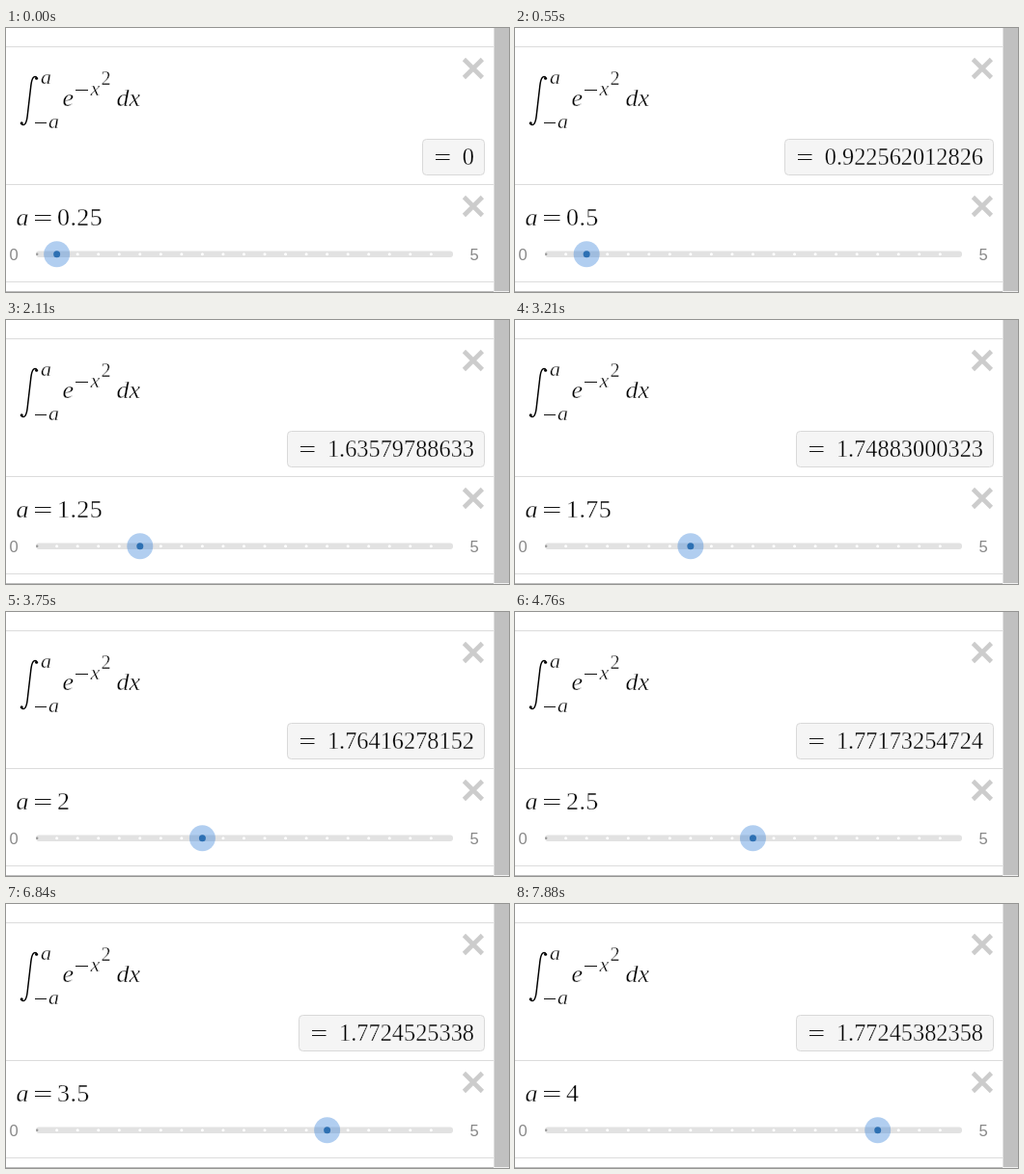
Recreate the animation shown at these times as an HTML page. Size 521 by 274 pixels, loop 8000 ms.

```html
<!DOCTYPE html>
<html>
<head>
<meta charset="utf-8">
<style>
  html, body { margin: 0; width: 521px; height: 274px; overflow: hidden; background: #fff; }
  svg { display: block; }
  /* A thin stroke in the background colour gives the letters a lighter weight. */
  text { font: 26px "Liberation Serif", "Times New Roman", serif; fill: #000; stroke: #fff; stroke-width: .4; }
  .i { font-style: italic; }
  .s { font-size: 22px; }
  .g { font: 16.5px "Liberation Sans", Arial, sans-serif; fill: #888; stroke: none; }
  .ink { stroke: #111; stroke-width: 1.2; fill: none; }
  #power { font-size: 20px; }
  #value { letter-spacing: .4px; }
  #result { font-size: 24.33px; stroke: #f5f5f5; }
</style>
</head>
<body>
<svg width="521" height="274" viewBox="0 0 521 274">
  <path d="M0 19.5H505M0 162.5H505M0 263.5H505" stroke="#dcdcdc"/>
  <rect x="505.5" width="15.5" height="273" fill="#c0c0c0"/>
  <path d="M0 273.5H505" stroke="#bdbdbd"/>
  <path d="M505 273.5H521" stroke="#f0f0f0"/>
  <path d="M474 32.5l19 19m0-19l-19 19M474 175.5l19 19m0-19l-19 19" transform="translate(.4)" stroke="#ccc" stroke-width="4.6"/>

  <path d="M16 99.5C19 102.5 21.3 99 22.2 91L25.8 60C26.7 52 29 48.5 32 51.5" fill="none" stroke="#000" stroke-width="1.5"/>
  <circle cx="16.2" cy="98.8" r="1.5"/>
  <circle cx="31.6" cy="52.2" r="1.5"/>
  <path class="ink" d="M30 98.5h12M72 64.5h13"/>
  <text class="i s" x="36" y="58">a</text>
  <text class="i s" x="44" y="104">a</text>
  <text class="i" x="58.5" y="81">e</text>
  <text class="i s" x="87.5" y="70">x</text>
  <text id="power" x="98.5" y="58.5">2</text>
  <text class="i" x="114.5" y="81">dx</text>

  <rect id="box" y="115.5" height="37" rx="4" fill="#f5f5f5" stroke="#d9d9d9"/>
  <path id="eq" class="ink" d="M14 131.5h14.5M14 136.5h14.5"/>
  <text id="result" x="485" y="142" text-anchor="end"></text>

  <text class="i" x="10.5" y="205">a</text>
  <path class="ink" d="M30 194.5h16.5M30 199.5h16.5"/>
  <text id="value" x="53" y="205"></text>

  <text class="g" x="3.5" y="241">0</text>
  <text class="g" x="480.4" y="241">5</text>
  <rect x="31" y="231.5" width="432" height="6.5" rx="3" fill="#e2e2e2"/>
  <g id="ticks" fill="#fff"></g>
  <circle cx="32.2" cy="234.7" r="1.2" fill="#999"/>
  <g id="thumb">
    <circle cy="234.7" r="13.5" fill="#327ed8" opacity=".38"/>
    <circle cy="234.7" r="3.5" fill="#2d70b3"/>
  </g>
</svg>
<script>
const $ = id => document.getElementById(id);
const LOOP = 8000, STEP = 0.25, DIGIT = 12.165;
// When the slider moves on, and how long the result takes to catch up.
const moves = [0, 520, 1050, 1550, 2060, 2590, 3210, 3720, 4250, 4760, 5270, 5780, 6310, 6840, 7340, 7880];
const lags = [40, 30, 0, 30, 50, 30, 0, 30, 0, 0, 30, 50, 30, 0, 30, 0];

const sliderX = a => 31.1 + 86.15 * a;

// Simpson's rule for the integral of exp(-x²) over [-a, a].
function integral(a, n = 2000) {
  const h = a / n, f = i => Math.exp(-((i * h) ** 2));
  let sum = f(0) + f(n);
  for (let i = 1; i < n; i++) sum += (i % 2 ? 4 : 2) * f(i);
  return 2 * sum * h / 3;
}

const results = ["0"];
moves.forEach((_, i) => results.push(String(+integral((i + 1) * STEP).toPrecision(12))));

for (let i = 1; i < 20; i++)
  $("ticks").innerHTML += `<circle cx="${sliderX(i * STEP)}" cy="234.7" r="1.5"/>`;

let shown = "";
function frame(now) {
  const t = now % LOOP;
  const pos = moves.filter(m => t >= m).length;
  const done = moves.filter((m, i) => t >= m + lags[i]).length;
  const key = pos + "/" + done;
  if (key !== shown) {
    shown = key;
    const a = pos * STEP, text = results[done];
    const digits = text.replace(".", "").length;
    const left = Math.round(431 - DIGIT * (digits - 1 + (text.includes(".") ? 0.5 : 0))) + 0.5;
    $("value").textContent = a;
    $("thumb").setAttribute("transform", `translate(${sliderX(a)})`);
    $("result").textContent = text;
    $("box").setAttribute("x", left);
    $("box").setAttribute("width", 495.5 - left);
    $("eq").setAttribute("transform", `translate(${left - 0.5})`);
  }
  requestAnimationFrame(frame);
}
frame(performance.now());
</script>
</body>
</html>
```
